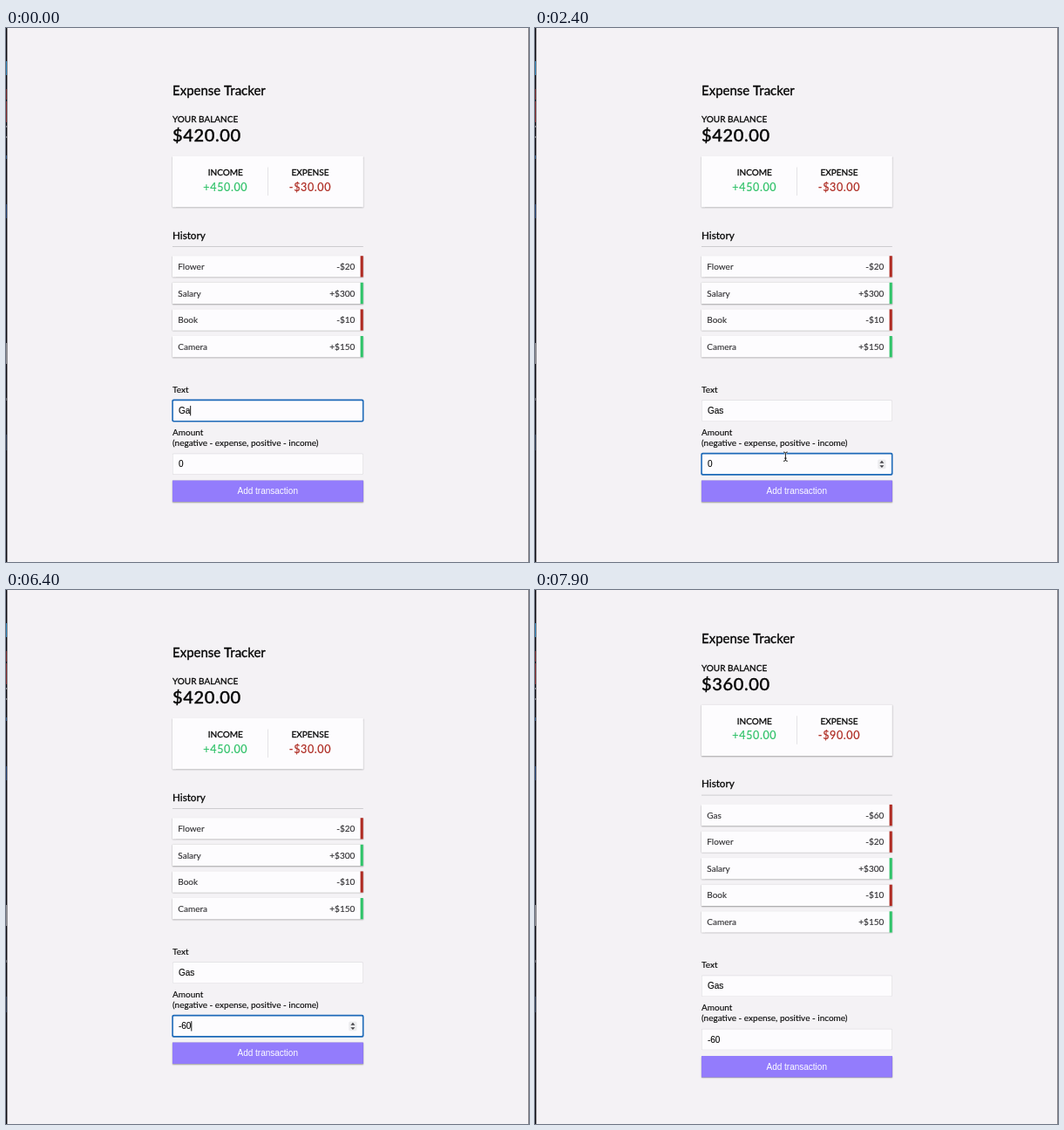
These frames come from a looping animation (600 px wide and 612 px high, 8000 ms). An HTML page with a canvas:

```html
<!DOCTYPE html>
<html lang="en">
<head>
<meta charset="utf-8">
<title>Expense Tracker</title>
<style>
  html, body { margin: 0; width: 100%; height: 100%; overflow: hidden; background: #f4f2f5; }
  canvas { display: block; width: 600px; height: 612px; }
</style>
</head>
<body>
<canvas id="stage"></canvas>
<script>
const W = 600, H = 612, LOOP = 8000, TICK = 100;
const LEFT = 191, WIDTH = 218.8, RIGHT = LEFT + WIDTH;
const GREEN = '#30c269', RED = '#ae2b22', PURPLE = '#937cfc', BLUE = '#1c69b8';
const LATO = 'Lato, sans-serif', ARIAL = '"Liberation Sans", Arial, sans-serif';

const canvas = document.getElementById('stage');
const ctx = canvas.getContext('2d');
const dpr = window.devicePixelRatio || 1;
canvas.width = W * dpr;
canvas.height = H * dpr;

// Value of the last step whose time has been reached
function stepAt(steps, t) {
  let value = steps[0][1];
  for (const [time, v] of steps) if (t >= time) value = v;
  return value;
}

// Linear path through [time, x, y] points
function pathAt(points, t) {
  for (let i = 1; i < points.length; i++) {
    const [t0, x0, y0] = points[i - 1], [t1, x1, y1] = points[i];
    if (t <= t1) {
      const k = Math.max(0, (t - t0) / (t1 - t0));
      return [x0 + (x1 - x0) * k, y0 + (y1 - y0) * k];
    }
  }
  return points[points.length - 1].slice(1);
}

function rect(x, y, w, h, color) {
  ctx.fillStyle = color;
  ctx.fillRect(x, y, w, h);
}

function roundRect(x, y, w, h, r, color) {
  ctx.beginPath();
  ctx.roundRect(x, y, w, h, r);
  ctx.fillStyle = color;
  ctx.fill();
}

function poly(points, color) {
  ctx.beginPath();
  points.forEach(([x, y]) => ctx.lineTo(x, y));
  ctx.closePath();
  ctx.fillStyle = color;
  ctx.fill();
}

function text(str, x, y, size, { font = LATO, color = '#050505', align = 'left', weight = 0.12, spacing = 0 } = {}) {
  ctx.font = `${size}px ${font}`;
  ctx.letterSpacing = spacing + 'px';
  ctx.textAlign = align;
  ctx.fillStyle = ctx.strokeStyle = color;
  ctx.lineWidth = weight;
  ctx.lineJoin = 'round';
  ctx.fillText(str, x, y);
  if (weight) ctx.strokeText(str, x, y);
  ctx.letterSpacing = '0px';
}

function card(y, h, color) {
  ctx.save();
  ctx.shadowOffsetY = 0.63 * dpr;
  for (const [blur, alpha] of [[1.9, 0.14], [1.25, 0.26]]) {
    ctx.shadowBlur = blur * dpr;
    ctx.shadowColor = `rgba(0,0,0,${alpha})`;
    rect(LEFT, y, WIDTH, h, color);
  }
  ctx.restore();
}

function edges() {
  rect(0, 0, 1.4, H, '#0b0a0f');
  const marks = [
    [38, 16, '#2a7fb4'], [70, 12, '#6d1f22'], [84, 24, '#7c2629'], [112, 2, '#77767c'], [124, 2, '#77767c'],
    [146, 4, '#224a78'], [202, 16, '#1d3b6c'], [361, 24, '#8a898e'], [424, 3, '#55545a'], [466, 18, '#25324a']
  ];
  for (const [y, h, color] of marks) rect(0, y, 1, h, color);
  rect(599.3, 0, 0.7, H, '#5a585e');
}

function summary(balance, expense) {
  const bold = { weight: 0.34 };
  text('Expense Tracker', LEFT, 76.7, 15, bold);
  text('YOUR BALANCE', LEFT, 108.2, 10, { weight: 0.28 });
  text(balance, LEFT, 130.2, 20, { weight: 0.45, spacing: 0.63 });

  card(147, 58.4, '#fdfcfe');
  rect(300.1, 159.6, 0.7, 32.5, '#d9d8db');
  const column = (label, value, x, color) => {
    text(label, x, 169.1, 10, { align: 'center', weight: 0.28 });
    text(value, x, 186.7, 12.5, { align: 'center', color, weight: 0.2, spacing: 0.63 });
  };
  column('INCOME', '+450.00', 251.8, GREEN);
  column('EXPENSE', expense, 349, RED);

  text('History', LEFT, 241.6, 11.7, { weight: 0.3 });
  rect(LEFT, 250, WIDTH, 0.8, '#c4c3c6');
}

function history(items) {
  items.forEach(([name, amount], i) => {
    const y = 261.2 + i * 30.6;
    const style = { color: '#2e2d30' };
    card(y, 24.3, '#fdfcfe');
    rect(RIGHT - 3.2, y, 3.2, 24.3, amount[0] === '-' ? RED : GREEN);
    text(name, LEFT + 6.3, y + 15.7, 10, style);
    text(amount, RIGHT - 9.5, y + 15.7, 10, { ...style, align: 'right' });
  });
}

function field(y, value, focused) {
  if (focused) {
    roundRect(LEFT - 0.7, y - 0.7, WIDTH + 1.4, 25.9, 2, BLUE);
    roundRect(LEFT + 0.9, y + 0.9, WIDTH - 1.8, 22.7, 1, '#fdfcfe');
  } else {
    roundRect(LEFT, y, WIDTH, 24.5, 1.3, '#e1e0e3');
    roundRect(LEFT + 0.65, y + 0.65, WIDTH - 1.3, 23.2, 1, '#fdfcfe');
  }
  text(value, LEFT + 6.9, y + 15.7, 10, { font: ARIAL });
}

function caret(y, before, alpha) {
  if (!alpha) return;
  ctx.font = `10px ${ARIAL}`;
  const x = LEFT + 6.9 + ctx.measureText(before).width;
  rect(x, y + 6.6, 0.9, 11.4, `rgba(0,0,0,${alpha})`);
}

function spinner(y) {
  roundRect(393.3, y + 7, 9.2, 10.8, 1.6, '#ececee');
  poly([[395.4, y + 11.2], [397.9, y + 8.3], [400.4, y + 11.2]], '#454448');
  poly([[395.4, y + 13.7], [397.9, y + 16.6], [400.4, y + 13.7]], '#454448');
}

const pointers = {
  beam() {
    const trace = () => {
      ctx.beginPath();
      ctx.moveTo(-2.4, -5.2);
      ctx.quadraticCurveTo(0, -5.2, 0, -3.8);
      ctx.quadraticCurveTo(0, -5.2, 2.4, -5.2);
      ctx.moveTo(0, -3.8);
      ctx.lineTo(0, 3.8);
      ctx.quadraticCurveTo(0, 5.2, -2.4, 5.2);
      ctx.moveTo(0, 3.8);
      ctx.quadraticCurveTo(0, 5.2, 2.4, 5.2);
      ctx.moveTo(-1.3, 1.9);
      ctx.lineTo(1.3, 1.9);
    };
    for (const [width, color] of [[2, 'rgba(255,255,255,.8)'], [0.95, '#111']]) {
      trace();
      ctx.lineWidth = width;
      ctx.strokeStyle = color;
      ctx.stroke();
    }
  },
  hand() {
    ctx.beginPath();
    ctx.moveTo(-2.4, 2);
    ctx.lineTo(-2.4, -4.6);
    ctx.quadraticCurveTo(-1.4, -6.4, -0.5, -4.6);
    ctx.lineTo(-0.4, -1.5);
    ctx.quadraticCurveTo(0.8, -2.4, 1.5, -1);
    ctx.quadraticCurveTo(2.6, -1.7, 3.1, -0.4);
    ctx.quadraticCurveTo(4.5, -0.8, 4.6, 0.7);
    ctx.quadraticCurveTo(4.5, 3, 3.4, 4.3);
    ctx.lineTo(3.2, 5.8);
    ctx.lineTo(-1.5, 5.8);
    ctx.quadraticCurveTo(-2, 4.2, -4.6, 1.2);
    ctx.quadraticCurveTo(-4.4, -0.3, -2.4, 2);
    ctx.fillStyle = '#fff';
    ctx.fill();
    ctx.lineWidth = 0.9;
    ctx.strokeStyle = '#111';
    ctx.stroke();
    ctx.lineWidth = 0.6;
    ctx.beginPath();
    for (const x of [-0.3, 1.2, 2.6]) {
      ctx.moveTo(x, 1.5);
      ctx.lineTo(x, 4);
    }
    ctx.stroke();
  },
  arrow() {
    const shape = [[0, 0], [0, 10], [2.3, 7.9], [3.9, 11.2], [5.3, 10.5], [3.8, 7.3], [7, 7.1]];
    poly(shape, '#111');
    ctx.lineWidth = 0.8;
    ctx.strokeStyle = '#fff';
    ctx.stroke();
  }
};

const POINTER = [
  [0, null], [300, 'beam'], [400, 'arrow'], [500, 'beam'], [3000, null],
  [6600, 'beam'], [6800, 'hand'], [7200, 'beam'], [7600, 'hand'], [7800, 'arrow'], [7900, null]
];
const TO_AMOUNT = [[300, 293, 443], [400, 290, 467], [600, 287.4, 491.2]];
const TO_BUTTON = [[6600, 287.4, 491.2], [6700, 287, 506], [6900, 286.6, 533]];
const LEAVE = [[7200, 285.3, 527.4], [7500, 285.3, 527.4], [7600, 292, 541], [7700, 322, 554], [7800, 402, 602]];

const NAME = [[0, 'Ga'], [100, 'Gas']];
const NAME_CARET = [[0, 1], [600, 0.5], [700, 0]];
// Typed value as [before caret, after caret]
const AMOUNT = [
  [0, ['', '0']], [3000, ['-', '0']], [4300, ['-6', '0']], [4700, ['-60', '0']],
  [5700, ['-600', '']], [6100, ['-60', '']]
];
const AMOUNT_CARET = [
  [0, 0], [900, 1], [1300, 0.5], [1400, 0], [1700, 0.5], [1800, 1], [2300, 0.5], [2400, 0],
  [2700, 0.5], [2800, 1], [3600, 0.5], [3700, 0], [4000, 0.5], [4100, 1],
  [5300, 0.5], [5400, 0], [5700, 1], [6600, 0.5], [6700, 0], [7000, 0]
];
const ITEMS = [['Flower', '-$20'], ['Salary', '+$300'], ['Book', '-$10'], ['Camera', '+$150']];

function drawPointer(t) {
  const kind = stepAt(POINTER, t);
  if (!kind) return;
  const route = t < 6600 ? TO_AMOUNT : t < 7200 ? TO_BUTTON : LEAVE;
  const [x, y] = pathAt(route, t);
  ctx.save();
  ctx.translate(x, y);
  pointers[kind]();
  ctx.restore();
}

function form(t) {
  const [before, after] = stepAt(AMOUNT, t);
  const nameY = 426.3, amountY = 487.5;
  const nameFocus = t < 800, amountFocus = t >= 800 && t < 7000;
  const hover = (t >= 500 && t < 800) || (t >= 7200 && t < 7600);

  text('Text', LEFT, 417.8, 10);
  field(nameY, stepAt(NAME, t), nameFocus);
  if (nameFocus) caret(nameY, stepAt(NAME, t), stepAt(NAME_CARET, t));

  text('Amount', LEFT, 467.1, 10);
  text('(negative - expense, positive - income)', LEFT, 478.8, 10);
  field(amountY, before + after, amountFocus);
  if (amountFocus) caret(amountY, before, stepAt(AMOUNT_CARET, t));
  if (amountFocus || hover) spinner(amountY);

  card(518.7, 24.3, PURPLE);
  text('Add transaction', 300.2, 534.3, 10, { font: ARIAL, color: '#fff', align: 'center', weight: 0 });
}

function draw(t) {
  const added = t >= 7200;
  const shift = added ? 15.3 : 0;
  ctx.setTransform(dpr, 0, 0, dpr, 0, 0);
  rect(0, 0, W, H, '#f4f2f5');
  edges();

  ctx.save();
  ctx.translate(0, -shift);
  summary(added ? '$360.00' : '$420.00', added ? '-$90.00' : '-$30.00');
  history(added ? [['Gas', '-$60'], ...ITEMS] : ITEMS);
  ctx.restore();

  ctx.save();
  ctx.translate(0, shift);
  form(t);
  ctx.restore();

  drawPointer(t);
}

const start = performance.now();
function frame(now) {
  const t = Math.max(0, now - start) % LOOP;
  draw(Math.floor(t / TICK) * TICK);
  requestAnimationFrame(frame);
}
draw(0);
requestAnimationFrame(frame);
</script>
</body>
</html>
```
